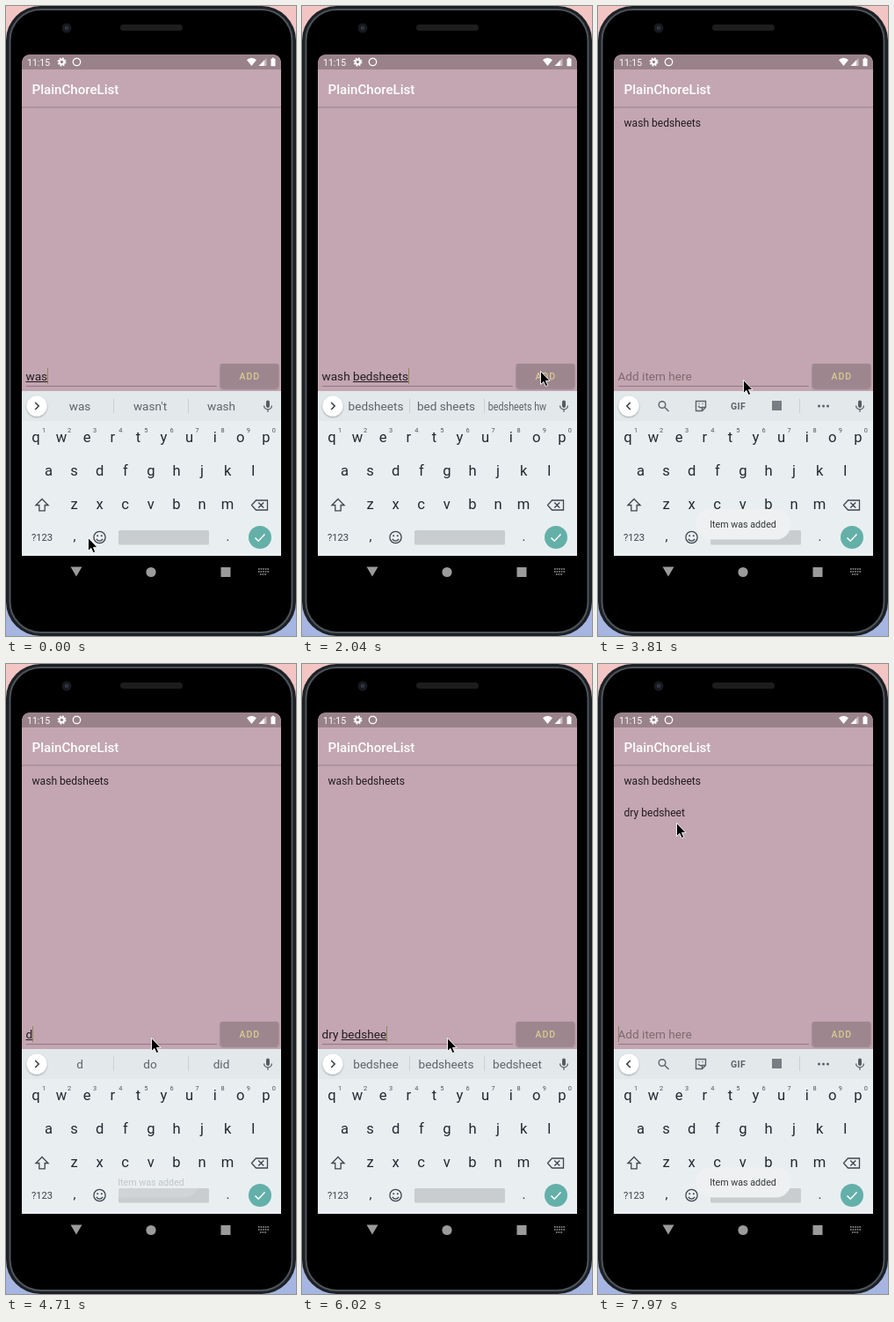
These frames come from a looping animation (330x715 px, 8 s). An HTML page:

```html
<!DOCTYPE html>
<html lang="en">
<head>
<meta charset="utf-8">
<title>To-do app</title>
<style>
html, body { margin: 0; width: 100%; height: 100%; overflow: hidden; }
body { position: relative; font-family: Roboto, sans-serif; }
svg { position: absolute; left: 0; top: 0; display: block; }
svg text { font-family: Roboto, sans-serif; }
.field { position: absolute; left: 22.5px; top: 411px; height: 18px; line-height: 18px; font-size: 13.6px; white-space: pre; color: #231c20; }
#hint { color: #80696f; }
#word { text-decoration: underline 1px; text-underline-offset: .6px; text-decoration-skip-ink: none; }
#caret { display: inline-block; width: 1px; height: 18px; margin-right: -1px; vertical-align: top; background: #8d8560; }
</style>
</head>
<body>
<svg id="stage" width="330" height="715" viewBox="0 0 330 715">
  <defs>
    <linearGradient id="wall" x2="0" y2="1">
      <stop stop-color="#f3c6c4"/><stop offset=".5" stop-color="#c8b4c6"/><stop offset="1" stop-color="#a5b5e2"/>
    </linearGradient>
    <linearGradient id="drop" x2="0" y2="1">
      <stop stop-color="#000" stop-opacity=".16"/><stop offset="1" stop-color="#000" stop-opacity="0"/>
    </linearGradient>
    <filter id="soft" x="-20%" y="-30%" width="140%" height="170%">
      <feDropShadow dx="0" dy="1" stdDeviation="1.1" flood-opacity=".35"/>
    </filter>
  </defs>

  <rect width="330" height="715" fill="url(#wall)"/>
  <rect width="330" height="715" rx="39" fill="#1d2125"/>
  <rect x="4.500" y="4" width="321" height="707" rx="35" fill="#000" stroke="#4d545b" stroke-width="2"/>
  <circle cx="69" cy="25" r="5.5" fill="#17191d"/>
  <circle cx="69" cy="25" r="2.4" fill="#2c3443"/>
  <rect x="130" y="21" width="71" height="7" rx="3.5" fill="#1d1d1e"/>

  <path d="M18 624V66q0-11 11-11H302q11 0 11 11V624z" fill="#c3a6b1"/>
  <path d="M18 72V66q0-11 11-11H302q11 0 11 11V72z" fill="#998289"/>
  <rect x="18" y="114" width="295" height="3" fill="url(#drop)"/>

  <g fill="none" stroke="#fff">
    <circle cx="63.5" cy="63.5" r="2.7" stroke-width="2"/>
    <circle cx="63.5" cy="63.5" r="4.2" stroke-width="1.6" stroke-dasharray="1.8 1.5"/>
    <circle cx="80.5" cy="63.5" r="4.2" stroke-width="1.3"/>
  </g>
  <g fill="#fff">
    <path d="M274 61.3q5.5-4.6 11 0L279.5 68z"/>
    <path d="M296.500 59V68h-9z" fill-opacity=".45"/><path d="M294 61.500V68H287.500z"/>
    <path d="M301.500 60h1.300v-1.200h2.400V60h1.300v8.200h-5z"/>
  </g>

  <rect x="23" y="431" width="217" height="1" fill="#91787f"/>
  <rect x="244" y="406" width="66" height="27.500" rx="2" fill="#9d868d" filter="url(#soft)"/>
  <rect id="press" x="244" y="406" width="66" height="27.500" rx="2" fill="#d8b9c4"/>

  <rect x="18" y="437" width="295" height="187" fill="#e9eef1"/>
  <rect x="18" y="437" width="295" height="34" fill="#e3e8eb"/>
  <circle cx="35" cy="454" r="11.5" fill="#fff" filter="url(#soft)"/>
  <path id="chevron" d="M-1.800-4L2.200 0L-1.800 4" fill="none" stroke="#333b40" stroke-width="1.500"/>
  <g fill="#555c61">
    <rect x="296" y="447.500" width="4" height="8.500" rx="2"/>
    <path d="M293.600 453.500a4.400 4.400 0 0 0 8.800 0M298 458v2.800" fill="none" stroke="#555c61" stroke-width="1.300"/>
  </g>

  <g id="suggest">
    <path d="M122.500 445.500V462M207.500 445.500V462" stroke="#cbd0d3"/>
  </g>
  <g id="tools" fill="none" stroke="#5b6368" stroke-width="1.400">
    <circle cx="73" cy="452.500" r="3.800"/><path d="M76 455.500L80.500 460"/>
    <path d="M111.500 448.500h11v7l-4 4h-7zM118.500 459.500v-4h4M114 454q2 2.500 4 1.500M114.500 451.500h1M118.500 451.500h1"/>
    <rect x="198" y="448" width="11" height="11" fill="#777e83" stroke="none"/>
    <path d="M229.500 445.500V462" stroke="#cbd0d3" stroke-width="1"/>
    <path d="M251.500 454h.01M256.500 454h.01M261.500 454h.01" stroke-width="3" stroke-linecap="round"/>
  </g>

  <g id="keys"></g>
  <g fill="none" stroke="#3c474d" stroke-width="1.300">
    <path d="M41 559.500l7 7h-3.800v6.300h-6.400v-6.300H34z"/>
    <path d="M284.500 561h13v11h-13l-5-5.500zM287.300 563.500l6 6M293.300 563.500l-6 6"/>
    <circle cx="106.500" cy="603" r="6.600"/>
    <path d="M102.800 605q3.700 4.300 7.400 0"/>
    <path d="M104.200 601.200h.01M108.800 601.200h.01" stroke-width="2" stroke-linecap="round"/>
  </g>
  <rect x="128" y="595" width="103" height="16.500" rx="1.500" fill="#c9cdd0"/>
  <circle cx="289" cy="603" r="13" fill="#63b0a9"/>
  <path d="M283.500 603.500l3.700 3.700 7.300-7.700" fill="none" stroke="#fff" stroke-width="1.600"/>

  <g fill="#9b9b9b">
    <path d="M73.500 636.500h13l-6.500 11z"/>
    <circle cx="165" cy="642.500" r="5.600"/>
    <rect x="244.500" y="637" width="11" height="11"/>
    <path d="M287 639h12M287 642h12M289 645h8" stroke="#9b9b9b" stroke-width="1.700" stroke-dasharray="1.600 1"/>
  </g>

  <g id="toast">
    <rect x="111" y="571" width="108.500" height="34.500" rx="17" fill="#eef0f1"/>
  </g>
</svg>

<div class="field" id="hint">Add item here</div>
<div class="field"><span id="done"></span><span id="word"></span><i id="caret"></i></div>

<svg width="330" height="715">
  <path id="mouse" d="M.5.500V15.500l3.400-3.100 2.300 5.200 2.500-1.100-2.200-5.100h4.500z" fill="#000" stroke="#fff" stroke-width=".9"/>
</svg>

<script>
const LOOP = 8000;
const $ = id => document.getElementById(id);
const NS = "http://www.w3.org/2000/svg";

function label(parent, str, x, y, size, fill, more = {}) {
  const el = document.createElementNS(NS, "text");
  const attrs = { x, y, "font-size": size, fill, stroke: "none", ...more };
  for (const k in attrs) el.setAttribute(k, attrs[k]);
  el.textContent = str;
  parent.append(el);
  return el;
}
const mid = { "text-anchor": "middle" };

// Fixed text
const stage = $("stage"), keys = $("keys");
label(stage, "11:15", 24, 67.5, 10.5, "#fff");
label(stage, "PlainChoreList", 29.5, 99.5, 15.1, "#fff", { "font-weight": 500 });
label(stage, "ADD", 277.4, 423.6, 10.5, "#d8ca92", { ...mid, "font-weight": 500, "letter-spacing": ".95" });
label($("tools"), "GIF", 159.5, 457.7, 10.5, "#5b6368", { ...mid, "font-weight": 700, "letter-spacing": ".4" });
label($("toast"), "Item was added", 165, 592.4, 10.7, "#33383b", mid);
const items = [
  label(stage, "wash bedsheets", 29.5, 137, 12.1, "#221b1f"),
  label(stage, "dry bedsheet", 29.5, 173, 12.1, "#221b1f")
];

// Keyboard
[["qwertyuiop", 34], ["asdfghjkl", 48.5], ["zxcvbnm", 77.5]].forEach(([row, x0], r) =>
  [...row].forEach((ch, i) => {
    const x = x0 + i * 29.1;
    label(keys, ch, x, 495 + r * 38, 16.6, "#202b31", mid);
    if (r === 0) label(keys, (i + 1) % 10, x + 9, 483.5, 7.4, "#4b565c", mid);
  }));
label(keys, "?123", 41, 607, 11.2, "#38434a", mid);
label(keys, ",", 78, 607, 15, "#202b31", mid);
label(keys, ".", 252.5, 607, 15, "#202b31", mid);

const slots = [84, 164, 245].map(x =>
  label($("suggest"), "", 0, 0, 13.6, "#5c6468", { ...mid, "data-x": x }));

// Each step: time, then the values that change
const steps = [
  [0, { done: "", word: "was", sug: "was|wasn't|wash", caret: 1, mouse: [93, 603], items: 0, toast: 0, press: 0, tools: 0 }],
  [90, { word: "wash", sug: "wash|washing|washed" }],
  [270, { done: "wash ", word: "", sug: "my|the|and" }],
  [540, { word: "b", sug: "b|but|by" }],
  [630, { word: "be", sug: "be|before|because" }],
  [810, { word: "bed", sug: "bed|beds|bedding" }],
  [980, { word: "beds" }],
  [1070, { sug: "beds|bedsheets|bedside" }],
  [1160, { word: "bedsh", sug: "bedsh|bedsheets|bedsheet" }],
  [1250, { word: "bedshe", sug: "bedshe|bedsheets|bedsheet" }],
  [1430, { word: "bedshee", sug: "bedshee|bedsheets|bedsheet" }],
  [1520, { word: "bedsheet", sug: "bedsheet|bedsheets|bed sheet" }],
  [1610, { word: "bedsheets", sug: "bedsheets|bed sheets|bedsheets hw" }],
  [1700, { mouse: [112, 584] }],
  [1790, { mouse: [164, 528] }],
  [1870, { mouse: [222, 466] }],
  [1950, { mouse: [260, 425] }],
  [2040, { mouse: [271, 414] }],
  [2220, { caret: 0, press: .14 }],
  [2400, { done: "", word: "", caret: 1 }],
  [2580, { items: 1, press: .06 }],
  [2670, { toast: .4, press: 0 }],
  [2760, { toast: .8, mouse: [258, 414] }],
  [2850, { toast: 1, caret: 0, mouse: [235, 415] }],
  [2940, { mouse: [220, 416] }],
  [3020, { mouse: [213, 416] }],
  [3110, { mouse: [200, 418] }],
  [3200, { mouse: [182, 421] }],
  [3290, { mouse: [170, 423] }],
  [3370, { mouse: [165, 424], caret: 1 }],
  [3450, { tools: .5 }],
  [3540, { tools: 1 }],
  [3810, { caret: 0 }],
  [4350, { caret: 1 }],
  [4440, { word: "d" }],
  [4530, { sug: "d|do|did", tools: 0, toast: .9 }],
  [4620, { toast: .6 }],
  [4710, { toast: .22 }],
  [4800, { word: "dr", sug: "dr|dry|drive", toast: 0 }],
  [4890, { word: "dry", sug: "dry|drying|dryer" }],
  [5050, { done: "dry ", word: "", sug: "the|and|my" }],
  [5140, { word: "b", sug: "b|by|but" }],
  [5230, { word: "be", sug: "be|bed|best" }],
  [5490, { word: "bed", sug: "bed|beds|bedding" }],
  [5580, { word: "beds", sug: "beds|bedsheets|bedside" }],
  [5760, { word: "bedsh", sug: "bedsh|bedsheets|bedsheet" }],
  [5840, { word: "bedshe", sug: "bedshe|bedsheets|bedsheet" }],
  [6020, { word: "bedshee", sug: "bedshee|bedsheets|bedsheet" }],
  [6110, { word: "bedsheet", sug: "bedsheet|bedsheets|bed sheet" }],
  [6200, { mouse: [180, 422] }],
  [6290, { mouse: [218, 418] }],
  [6380, { mouse: [252, 415] }],
  [6470, { mouse: [267, 413] }],
  [6650, { caret: 0, press: .14 }],
  [6920, { done: "", word: "", caret: 1, press: .08 }],
  [7010, { press: .04 }],
  [7180, { items: 2, press: 0 }],
  [7270, { toast: .4 }],
  [7350, { toast: .8 }],
  [7440, { toast: 1, caret: 0 }],
  [7610, { mouse: [250, 391] }],
  [7700, { mouse: [203, 329] }],
  [7790, { mouse: [143, 250] }],
  [7880, { mouse: [103, 198], tools: .5 }],
  [7970, { mouse: [89, 180], tools: 1, caret: 1 }]
];

let state = {};
const scenes = steps.map(([at, patch]) => ({ at, ...(state = { ...state, ...patch }) }));
let shown = null;

function draw(s) {
  $("done").textContent = s.done;
  $("word").textContent = s.word;
  $("hint").style.visibility = s.done + s.word ? "hidden" : "visible";
  $("caret").style.opacity = s.caret;
  $("mouse").setAttribute("transform", `translate(${s.mouse})`);
  $("toast").style.opacity = s.toast;
  $("press").style.opacity = s.press;
  $("tools").style.opacity = s.tools;
  $("suggest").style.opacity = s.tools ? (1 - s.tools) / 2 : 1;
  $("chevron").setAttribute("transform", `translate(35 454) scale(${s.tools === 1 ? -1 : 1} 1)`);
  items.forEach((el, i) => el.style.opacity = i < s.items ? 1 : 0);
  s.sug.split("|").forEach((str, i) => {
    // The keyboard condenses long suggestions
    const squeeze = str.length > 10 ? .79 : 1;
    slots[i].textContent = str;
    slots[i].setAttribute("transform", `translate(${slots[i].dataset.x} 458.800) scale(${squeeze} 1)`);
  });
}

const start = performance.now();
function tick() {
  const t = (performance.now() - start) % LOOP;
  const scene = scenes.findLast(s => s.at <= t) || scenes[0];
  if (scene !== shown) draw(shown = scene);
  requestAnimationFrame(tick);
}
draw(shown = scenes[0]);
requestAnimationFrame(tick);
</script>
</body>
</html>
```
